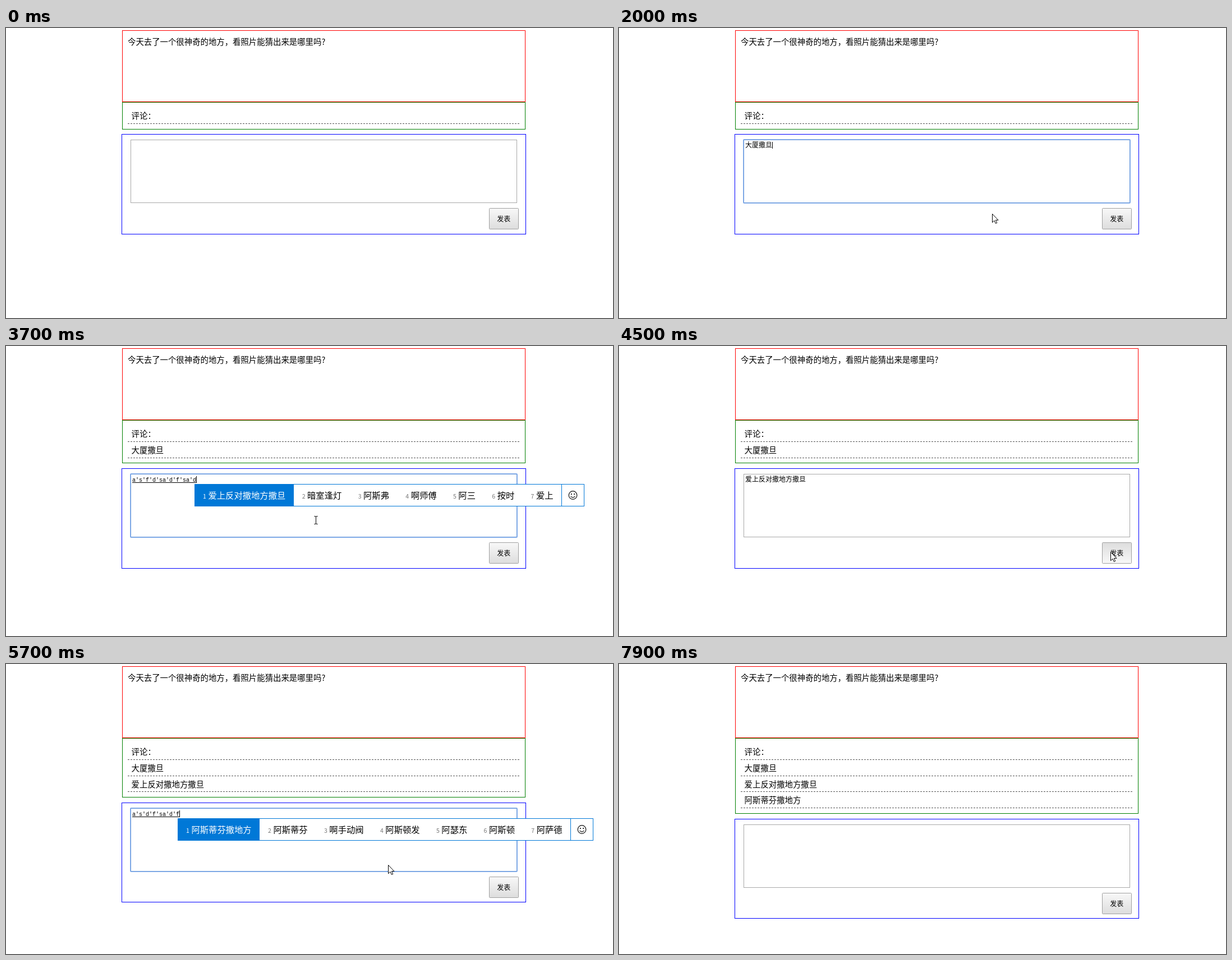
Write an HTML page that moves like this. It is 1082 by 517 pixels and loops after 8.4 s.

```html
<!DOCTYPE html>
<html lang="zh-CN">
<head>
<meta charset="utf-8">
<style>
html, body { margin: 0; width: 100%; height: 100%; overflow: hidden; background: #fff; }
svg { display: block; width: 1082px; height: 517px; }
text { font-family: "Noto Sans CJK SC", "Noto Sans CJK", sans-serif; white-space: pre; }
.body { font-size: 14.4px; }
.small { font-size: 12px; }
.mono { font-family: "Liberation Mono", monospace; font-size: 10px; }
.word { font-size: 15.33px; }
.num { font-size: 10.5px; }
</style>
</head>
<body>
<svg id="stage" viewBox="0 0 1082 517" lang="zh-CN">
  <defs>
    <linearGradient id="up" x2="0" y2="1"><stop stop-color="#f8f8f8"/><stop offset="1" stop-color="#dddddd"/></linearGradient>
    <linearGradient id="down" x2="0" y2="1"><stop stop-color="#dddddd"/><stop offset="1" stop-color="#f8f8f8"/></linearGradient>
  </defs>
  <rect width="1082" height="517" fill="#fff"/>
  <g id="page"></g>
  <g id="ime"></g>
  <g id="cursor"></g>
</svg>
<script>
const LOOP = 8400, STEP = 100, ROW = 28.8;
const layers = ['page', 'ime', 'cursor'].map(id => document.getElementById(id));

// one round per comment: focus the field, type, commit the word, press the button
const rounds = [
  { focus: 600, type: 900, full: 1500, commit: 1900, press: 2400, submit: 2500,
    keys: "da's'sa'da", result: '大厦撒旦', others: '都是 但是 多少 丢失 达式 诞生' },
  { focus: 3100, type: 3200, full: 3500, commit: 4000, press: 4400, submit: 4600,
    keys: "a's'f'd'sa'd'f'sa'd", result: '爱上反对撒地方撒旦', others: '暗室逢灯 阿斯弗 啊师傅 阿三 按时 爱上' },
  { focus: 4900, type: 5100, full: 5400, commit: 5900, press: 6300, submit: 6500,
    keys: "a's'd'f'sa'd'f", result: '阿斯蒂芬撒地方', others: '阿斯蒂芬 啊手动阀 阿斯顿发 阿瑟东 阿斯顿 阿萨德' }
];

// pointer moves: begin, end, x, y; a glide slows down towards its end
const moves = [
  { at: 0, to: 100, x: 470, y: 112 },
  { at: 100, to: 400, x: 443, y: 287 },
  { at: 1800, to: 2300, x: 877, y: 341, glide: true },
  { at: 2600, to: 3000, x: 378, y: 259 },
  { at: 3000, to: 3400, x: 400, y: 292 },
  { at: 3400, to: 3700, x: 552, y: 310 },
  { at: 3700, to: 4100, x: 820, y: 369 },
  { at: 4100, to: 4400, x: 876, y: 367 },
  { at: 4600, to: 4800, x: 412, y: 310 },
  { at: 5300, to: 5700, x: 681, y: 358 },
  { at: 5700, to: 6200, x: 870, y: 381, glide: true },
  { at: 6700, to: 6800, x: 877, y: 382 },
  { at: 7000, to: 7300, x: 1015, y: 162 },
  { at: 7300, to: 7500, x: 1007, y: 64 },
  { at: 7500, to: 7800, x: 1070, y: 34 }
];

const between = (t, a, b) => t >= a && t < b;
const easeOut = (k, power) => 1 - (1 - k) ** power;
const down = (base, n) => Math.floor(base + ROW * n);
const text = (x, y, cls, s, fill = '#000') =>
  `<text x="${x}" y="${y}" class="${cls}" fill="${fill}">${s}</text>`;
const fillBox = (x, y, w, h, fill) =>
  `<rect x="${x}" y="${y}" width="${w}" height="${h}" fill="${fill}"/>`;
// one-pixel frame covering the inclusive pixel range
const frame = (x0, y0, x1, y1, color, fill = 'none', r = 0) =>
  `<rect x="${x0 + .5}" y="${y0 + .5}" width="${x1 - x0}" height="${y1 - y0}" rx="${r}" fill="${fill}" stroke="${color}"/>`;

function fieldState(t, round) {
  if (!round || t < round.type) return { value: '' };
  if (t >= round.commit) return { value: round.result };
  const { keys, result, others, type, full } = round;
  const k = Math.min(1, (t - type + STEP) / (full - type + STEP));
  const part = s => s.slice(0, Math.ceil(s.length * k));
  return { value: part(keys), composing: true, words: k > .5 ? [part(result), ...others.split(' ')] : [] };
}

function drawPost(n) {
  let s = frame(207, 4, 925, 131, '#ff0000') +
    frame(207, 132, 925, down(180.1, n), '#008000') +
    text(217, 30, 'body', '今天去了一个很神奇的地方，看照片能猜出来是哪里吗?');
  ['评论：', ...rounds.map(r => r.result)].slice(0, n + 1).forEach((line, i) => {
    s += text(223.6, Math.round(162 + ROW * i), 'body', line) +
      `<path d="M217 ${down(170.2, i) + .5}H916" stroke="#555" stroke-dasharray="3 2"/>`;
  });
  return s;
}

function drawForm(t, n, top, round, { value, composing }) {
  const btn = down(321.6, n);
  const focused = round && between(t, round.focus, round.press);
  const pressed = round && between(t, round.press, round.submit);
  const end = 225 + value.length * (composing ? 6 : 12);
  let s = frame(206, down(189.6, n), 926, down(367.2, n), '#0000ff');
  if (focused) s += frame(221, top - 1, 911, top + 113, '#8fb5ee', 'none', 1);
  s += frame(222, top, 910, top + 112, focused ? '#6c9bdc' : '#a9a9a9');
  s += text(225, top + 13.5, composing ? 'mono' : 'small', value);
  if (composing) s += fillBox(225, top + 15, end - 225, 1, '#000');
  if (focused) s += fillBox(end, top + 4, 1, 12, '#000');
  s += frame(861, btn, 913, btn + 37, '#a0a0a0', `url(#${pressed ? 'down' : 'up'})`, 1);
  return s + text(875.3, btn + 24, 'small', '发表');
}

function drawIme(top, { value, words }) {
  if (!words || !words.length) return '';
  const left = 222 + value.length * 6, y = top + 18, base = y + 26;
  let x = left, cells = '';
  words.forEach((word, i) => {
    const w = 38.67 + 15.33 * word.length;
    if (!i) cells += fillBox(x, y, Math.round(w), 40, '#0078d7');
    cells += text(x + 15, base, 'num', i + 1, i ? '#777' : '#fff') +
      text(x + 24.4, base, 'word', word, i ? '#000' : '#fff');
    x += w;
  });
  x = Math.round(x);
  const cx = x + 20.5, cy = y + 20;
  return fillBox(left, y, x + 40 - left, 40, '#fff') + cells +
    frame(left, y, x + 40, y + 39, '#0078d7') + fillBox(x, y, 1, 40, '#0078d7') +
    `<circle cx="${cx}" cy="${cy}" r="7.3" fill="none" stroke="#111" stroke-width="1.2"/>` +
    `<circle cx="${cx - 2.6}" cy="${cy - 2}" r="1.1"/><circle cx="${cx + 2.6}" cy="${cy - 2}" r="1.1"/>` +
    `<path d="M${cx - 4} ${cy + 1.8}q4 4.6 8 0" fill="none" stroke="#111" stroke-width="1.1"/>`;
}

function pointer(t) {
  const i = moves.filter(m => m.at <= t).length - 1;
  const m = moves[i], from = moves[i - 1] || m;
  const k = Math.min(1, (t - m.at) / (m.to - m.at));
  const mix = (a, b, power) => Math.round(a + (b - a) * easeOut(k, m.glide ? power : 1));
  return [mix(from.x, m.x, 1.4), mix(from.y, m.y, 3.4)];
}

function drawCursor(t, top) {
  if (!between(t, 100, 7900)) return '';
  const [x, y] = pointer(t);
  const overField = between(x, 223, 911) && between(y, top, top + 116);
  const keepsArrow = between(t, 5400, 6800);
  const shape = overField && !keepsArrow
    ? '<path d="M-2.5 -6.5H-1Q.5 -6.5 .5 -5Q.5 -6.5 2 -6.5H3.5M.5 -5.5V6.5M-2.5 7.5H-1Q.5 7.5 .5 6Q.5 7.5 2 7.5H3.5" fill="none" stroke="#000"/>'
    : '<path d="M.5 .5V15.7L4 12.4L6.4 17.5L8.7 16.5L6.4 11.5H11Z" fill="#fff" stroke="#000"/>';
  return `<g transform="translate(${x} ${y})">${shape}</g>`;
}

function render(t) {
  const n = rounds.filter(r => r.submit <= t).length;
  const top = down(199.9, n), round = rounds[n];
  const field = fieldState(t, round);
  const parts = [drawPost(n) + drawForm(t, n, top, round, field), drawIme(top, field), drawCursor(t, top)];
  parts.forEach((s, i) => { layers[i].innerHTML = s; });
}

let shown = -1;
function tick() {
  const t = Math.floor(performance.now() % LOOP / STEP) * STEP;
  if (t !== shown) render(shown = t);
  requestAnimationFrame(tick);
}
tick();
</script>
</body>
</html>
```
